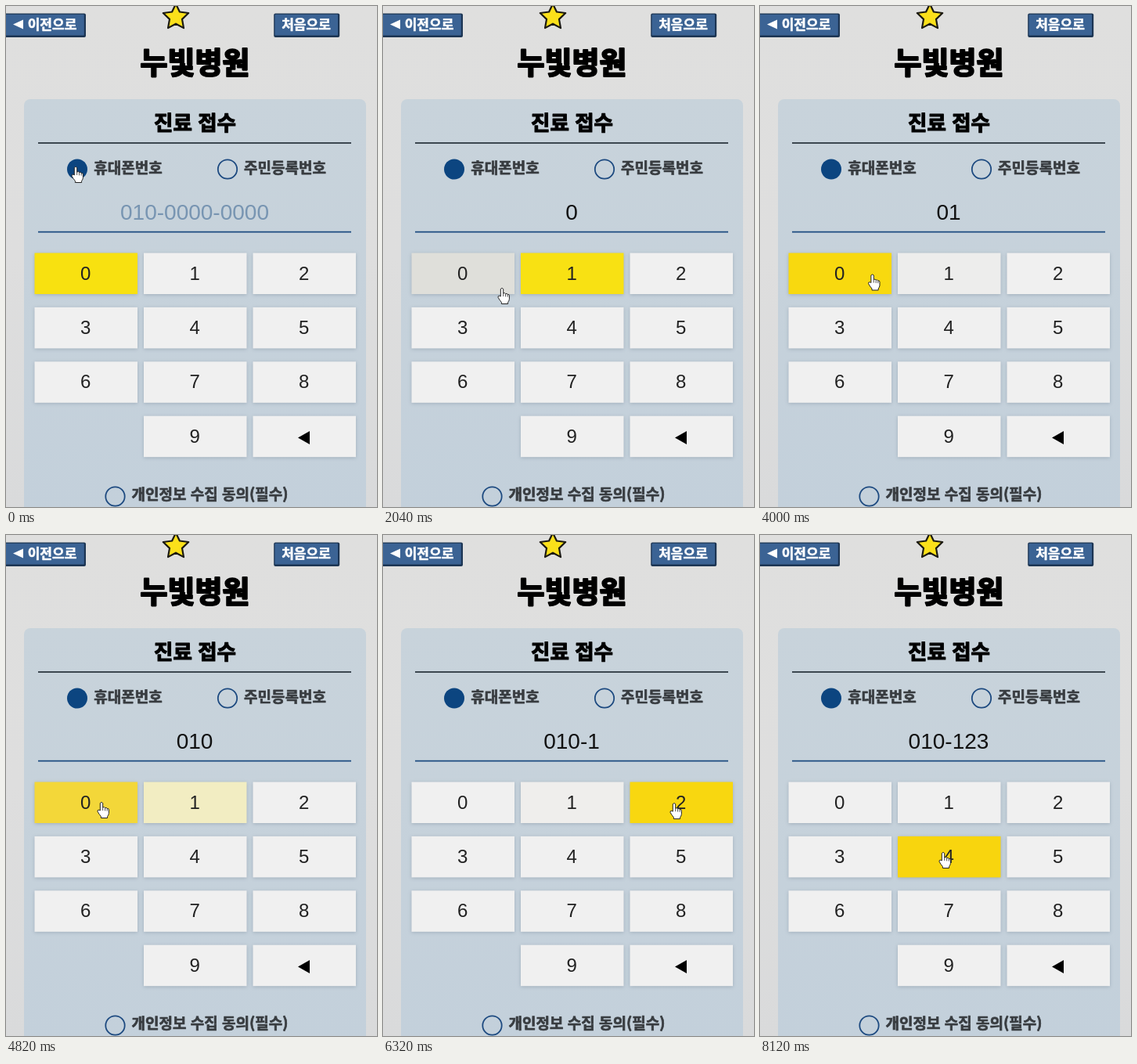
These frames come from a looping animation (474 by 640 pixels, 8180 ms). An HTML page:

```html
<!DOCTYPE html>
<html lang="ko">
<head>
<meta charset="utf-8">
<style>
  html, body { margin: 0; width: 100%; height: 100%; overflow: hidden; background: #dedede; }
  svg { display: block; width: 474px; height: 640px; }
  text { text-anchor: middle; }
  .ko { font-family: "Noto Sans CJK KR", "Noto Sans CJK", sans-serif; font-weight: 900; stroke-linejoin: round; }
  .label { font-size: 19px; fill: #383c40; stroke: #383c40; stroke-width: .7; }
  .nav { font-size: 17px; fill: #fff; stroke: #fff; stroke-width: .6; }
  .num { font-family: "Liberation Sans", Arial, sans-serif; }
  .ring { fill: none; stroke: #1d4a80; stroke-width: 1.8; }
  .key rect { filter: drop-shadow(0 1.5px 2px rgba(50, 70, 90, .25)); }
  .key text { font-size: 24px; fill: #222; }
</style>
</head>
<body>
<svg viewBox="0 0 474 640">
  <defs>
    <linearGradient id="wall" x2="0" y2="1">
      <stop offset="0" stop-color="#dfdfde"/>
      <stop offset=".5" stop-color="#dedede"/>
      <stop offset="1" stop-color="#d9dadb"/>
    </linearGradient>
    <linearGradient id="glass" x2="0" y2="1">
      <stop offset="0" stop-color="#c8d3db"/>
      <stop offset="1" stop-color="#c3d0db"/>
    </linearGradient>
  </defs>
  <rect width="474" height="640" fill="url(#wall)"/>
  <rect x="23" y="119" width="437" height="540" rx="8" fill="url(#glass)"/>

  <g id="nav">
    <rect x="-6" y="9.5" width="108" height="30.5" rx="2" fill="#1c3553"/>
    <rect x="-6" y="10.8" width="105.8" height="26.7" rx="1" fill="#3b6394"/>
    <path d="M9 23.5 22 17.5V29.5Z" fill="#fff"/>
    <text class="ko nav" x="59" y="29.8">이전으로</text>
    <rect x="342.2" y="9.5" width="84" height="30.5" rx="2" fill="#1c3553"/>
    <rect x="343.5" y="10.8" width="80.5" height="26.7" rx="1" fill="#3b6394"/>
    <text class="ko nav" x="383.5" y="29.8">처음으로</text>
  </g>
  <path id="star" fill="#fbe01a" stroke="#1c1a12" stroke-width="2.2" stroke-linejoin="round"/>

  <text class="ko" x="241.5" y="85.7" font-size="38" stroke="#000" stroke-width="2.2">누빛병원</text>
  <text class="ko" x="241.5" y="158.5" font-size="26.5" stroke="#000" stroke-width="1.2">진료 접수</text>
  <path d="M41 175H441" stroke="#3c4750" stroke-width="1.8"/>
  <circle cx="91" cy="208.5" r="13" fill="#0c4580"/>
  <text class="ko label" x="156" y="213.5">휴대폰번호</text>
  <circle class="ring" cx="283" cy="208.5" r="12.2"/>
  <text class="ko label" x="356.5" y="213.5">주민등록번호</text>
  <text id="field" class="num" x="241" y="273" font-size="28"></text>
  <path d="M41 288.7H441" stroke="#1c4b80" stroke-width="1.8"/>
  <g id="keys"></g>
  <circle class="ring" cx="139.5" cy="626.5" r="12.2"/>
  <text class="ko label" x="260.5" y="631">개인정보 수집 동의(필수)</text>

  <g id="cursor" fill="#fff" stroke="#222" stroke-width="1" stroke-linejoin="round">
    <g id="hand">
      <path d="M-1.7 11V1.5Q0-.8 1.7 1.5V7Q3.5 5.8 4.6 7.6Q6.2 6.6 7.2 8.4Q9.3 7.8 9.4 10V14.5Q9 17 7.6 18.5V20.5H-.6V18.5Q-3.2 15.6-5 12.2Q-5.2 9.8-3.2 10.2Z"/>
      <path d="M1.7 7V11M4.6 8V11.4M7.2 8.6V11.6" stroke-width=".8"/>
    </g>
    <path id="arrow" d="M0 0V13.5L3.1 10.7 5.2 15.6 7.4 14.6 5.3 9.9H9.6Z"/>
  </g>
</svg>
<script>
const LOOP = 8180, FADE = 300;
const KEY_W = 131.5, KEY_H = 52.5;
const NS = "http://www.w3.org/2000/svg";
const $ = id => document.getElementById(id);
const PLAIN = [240, 240, 240], GREY = [223, 223, 221];
const YELLOW = [248, 225, 16], GOLD = [248, 213, 14];

// [time, key that lights up next, field content]
const steps = [
  [0, 0, ""], [1770, 1, "0"], [3130, 0, "01"], [4783, 1, "010"],
  [5890, 2, "010-1"], [6430, 3, "010-12"], [7430, 4, "010-123"]
];

// [time, x, y] of the pointer tip
const path = [
  [0, 89, 205], [450, 89, 205], [1250, 128, 350], [1800, 130, 352],
  [2040, 152, 360], [2720, 234, 350], [3360, 235, 349], [4250, 122, 341],
  [4860, 122, 341], [5550, 246, 331], [5920, 247, 331], [6290, 372, 342],
  [6470, 372, 344], [7080, 148, 440], [7340, 124, 412], [7480, 124, 410],
  [7920, 234, 405], [8180, 234, 405]
];

function make(tag, parent, attrs) {
  const el = document.createElementNS(NS, tag);
  for (const name in attrs) el.setAttribute(name, attrs[name]);
  return parent.appendChild(el);
}

const mix = (a, b, k) => a.map((v, i) => v + (b[i] - v) * k);
const smooth = u => u * u * (3 - 2 * u);
const easeOut = u => 1 - (1 - u) ** 1.8;

function stepAt(t) {
  return steps.filter(s => s[0] <= t).pop();
}

function pointerAt(t) {
  const i = path.findIndex(p => p[0] > t);
  const [t0, ...a] = path[i - 1], [t1, ...b] = path[i];
  return mix(a, b, smooth((t - t0) / (t1 - t0)));
}

const inside = (k, [x, y]) => x >= k.x && x < k.x + KEY_W && y >= k.y && y < k.y + KEY_H;

const keys = Array.from({ length: 11 }, (_, n) => {
  const slot = n < 9 ? n : n + 1;
  const x = 36.5 + slot % 3 * 139.5, y = 315.5 + Math.floor(slot / 3) * 69.4;
  const g = make("g", $("keys"), { class: "key" });
  const box = make("rect", g, { x, y, width: KEY_W, height: KEY_H });
  if (n < 10) make("text", g, { class: "num", x: x + 65.2, y: y + 34 }).textContent = n;
  else make("path", g, { d: `M${x + 57.5} ${y + 27.7}l15-8.5v17z` });
  return { n, x, y, box, fades: [] };
});

function goal(key, t) {
  const lit = stepAt(t)[1] === key.n, over = inside(key, pointerAt(t));
  return lit ? (over ? GOLD : YELLOW) : (over ? GREY : PLAIN);
}

function colourAt(key, t) {
  const f = key.fades.filter(f => f.t <= t).pop();
  return mix(f.from, f.to, easeOut(Math.min(1, (t - f.t) / FADE)));
}

// Each change of state starts a fade from the colour reached so far.
for (const key of keys) {
  const first = goal(key, 0);
  key.fades.push({ t: 0, from: first, to: first });
  for (let t = 5; t < LOOP; t += 5) {
    const to = goal(key, t);
    if (to !== key.fades.at(-1).to) key.fades.push({ t, from: colourAt(key, t), to });
  }
}

$("star").setAttribute("d", "M" + Array.from({ length: 10 }, (_, i) => {
  const r = i % 2 ? 8.4 : 17, a = i * Math.PI / 5;
  return [217 + r * Math.sin(a), 14.3 - r * Math.cos(a)].map(v => v.toFixed(1));
}).join("L") + "Z");

function draw(now) {
  const t = now % LOOP, tip = pointerAt(t), text = stepAt(t)[2];
  for (const key of keys) {
    key.box.setAttribute("fill", `rgb(${colourAt(key, t).map(Math.round)})`);
  }
  $("field").textContent = text || "010-0000-0000";
  $("field").setAttribute("fill", text ? "#111" : "#7895b2");
  const radio = Math.hypot(tip[0] - 91, tip[1] - 208.5) < 13;
  const hand = radio || keys.some(k => inside(k, tip));
  $("hand").style.display = hand ? "" : "none";
  $("arrow").style.display = hand ? "none" : "";
  $("cursor").setAttribute("transform", `translate(${tip})`);
}

const start = performance.now();
function tick() {
  draw(performance.now() - start);
  requestAnimationFrame(tick);
}
tick();
</script>
</body>
</html>
```
